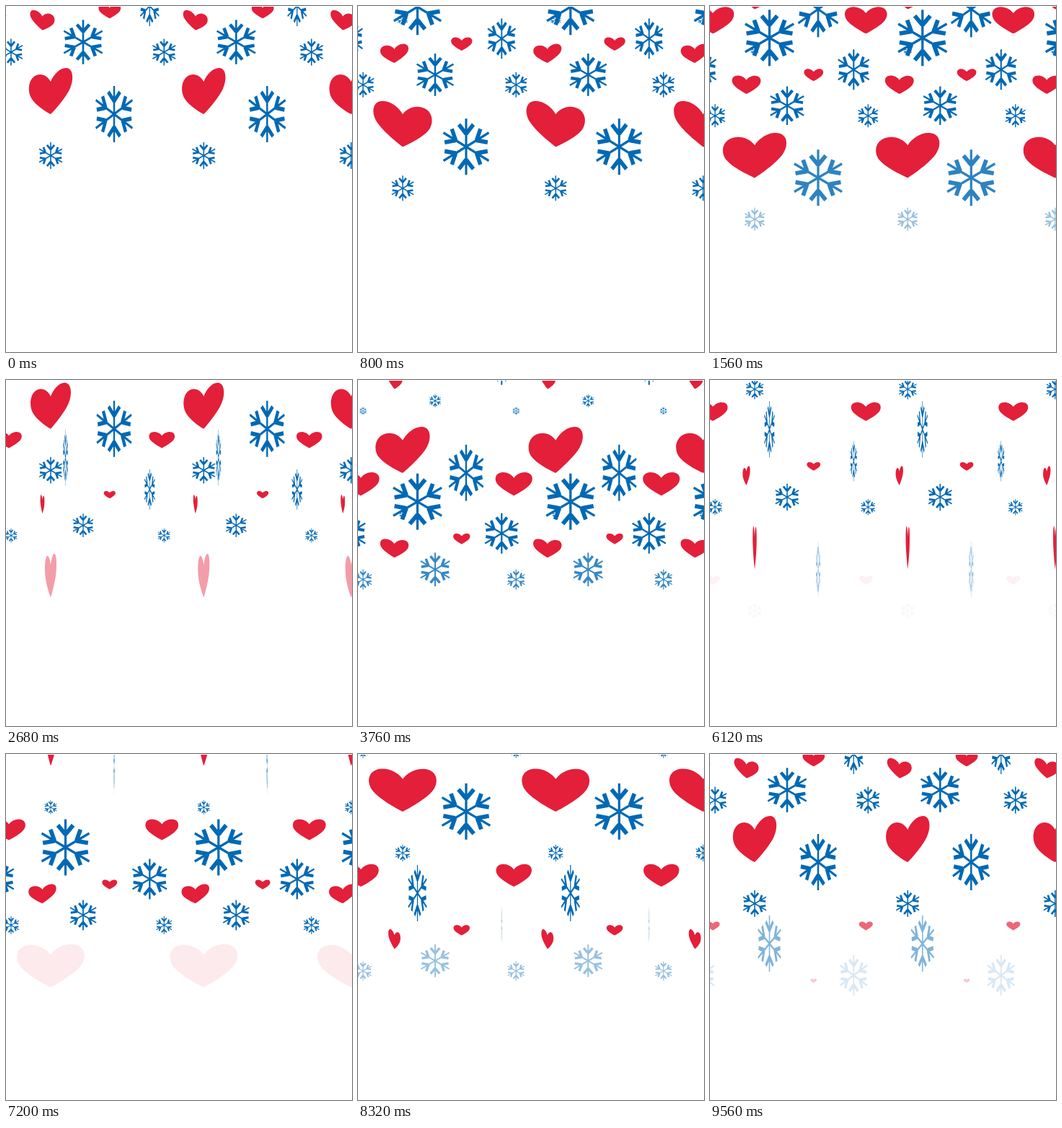
Write an HTML page with a canvas that moves like this. It is 480 by 480 pixels and loops after 9.6 s.

```html
<!DOCTYPE html>
<html>
<head>
<meta charset="utf-8">
<title>Falling hearts and snowflakes</title>
<style>
html, body { margin: 0; width: 100%; height: 100%; overflow: hidden; background: #fff; }
canvas { display: block; }
</style>
</head>
<body>
<canvas id="stage" width="480" height="480"></canvas>
<script>
const ctx = document.getElementById('stage').getContext('2d');
const LOOP = 9600, STEP = 40;
const SPEED = 0.0566, FADE = 64;
const SPIN = 2 * Math.PI / 1440, BEAT = 2 * SPIN;
const BLUE = '#0069b4', RED = '#e31f3a';
const TILES = [0, 212.3, 416.8];
const WAVES = [0, 4134, 9560];

// size: radius of a flake or half width of a heart; end: height where it is gone.
// Items with a spin angle turn around the vertical axis, the others pulse.
const ITEMS = [
  { x: 82.5, y: -44, size: 39, end: 295, spin: -.6 },
  { x: 150, y: 150, size: 39, end: 291, spin: -.72 },
  { x: -13, y: 0, size: 28, end: 317, spin: -1 },
  { x: 107, y: 50, size: 31, end: 313 },
  { x: 7, y: 64, size: 18.5, end: 328 },
  { x: 62, y: 207.5, size: 18.5, end: 323 },
  { x: 62, y: 120.5, size: 47, end: 300, spin: -.87, tilt: .33, heart: true },
  { x: 50.5, y: 21, size: 20, end: 325, spin: -.55, tilt: -.45, heart: true },
  { x: 143.8, y: 7.5, size: 15.5, end: 330, heart: true },
  { x: 4, y: -68.5, size: 34, end: 282, heart: true }
];

const heart = new Path2D(
  'M0 .63C-.3 .48-.72 .22-.88 .02C-1.05-.18-1.05-.5-.78-.6C-.5-.7-.15-.55 0-.33' +
  'C.15-.55 .5-.7 .78-.6C1.05-.5 1.05-.18 .88 .02C.72 .22 .3 .48 0 .63Z');

const flake = new Path2D();
function addBar(matrix, length, width) {
  const bar = new Path2D();
  bar.rect(0, -width / 2, length, width);
  flake.addPath(bar, matrix);
}
for (let i = 0; i < 6; i++) {
  const arm = new DOMMatrix().rotate(30 + 60 * i);
  addBar(arm, 1, .085);
  for (const side of [-1, 1]) addBar(arm.translate(.46, 0).rotate(40 * side), .43, .15);
}

function drawItem(item, age) {
  const y = item.y + SPEED * age;
  const alpha = Math.min(1, (item.end - y) / FADE);
  if (alpha <= 0 || y < -60) return;
  const spins = item.spin !== undefined;
  const angle = spins ? SPIN * age + item.spin : 0;
  const pulse = spins ? 1 : .64 + .36 * Math.cos(BEAT * age - .15);
  const height = item.size * pulse;
  const width = height * Math.cos(angle);
  const skew = (item.tilt || 0) * Math.sin(angle) * width;
  ctx.globalAlpha = alpha;
  ctx.fillStyle = item.heart ? RED : BLUE;
  for (const left of TILES) {
    ctx.setTransform(width, skew, 0, height, left + item.x, y);
    ctx.fill(item.heart ? heart : flake);
  }
}

function clear(height) {
  ctx.setTransform(1, 0, 0, 1, 0, 0);
  ctx.globalAlpha = 1;
  ctx.fillStyle = '#fff';
  ctx.fillRect(0, 0, 480, height);
}

function render(now) {
  const t = Math.floor((now % LOOP) / STEP) * STEP;
  clear(480);
  for (const item of ITEMS) {
    for (const begin of WAVES) drawItem(item, t - begin);
  }
  clear(1);
}

const start = performance.now();
function tick() {
  render(performance.now() - start);
  requestAnimationFrame(tick);
}
tick();
</script>
</body>
</html>
```
